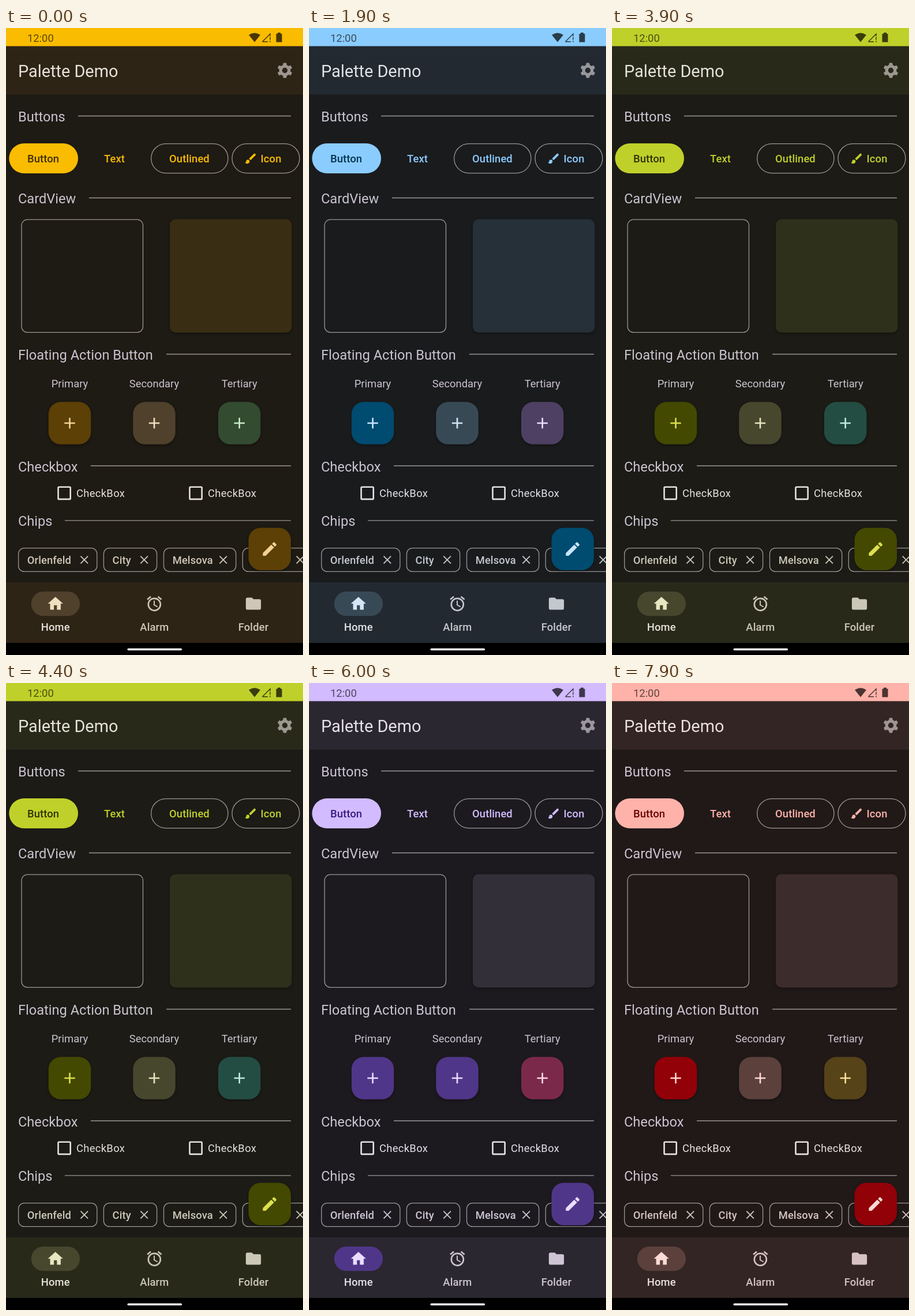
An HTML page for the animation above (8000 ms loop, 515 by 1087 pixels).

```html
<!DOCTYPE html>
<html lang="en">
<head>
<meta charset="utf-8">
<title>Colour themes</title>
<style>
html, body { margin: 0; width: 100%; height: 100%; overflow: hidden; background: #000; }
svg {
  display: block; width: 100%; height: 100%;
  font: 18.375px Roboto, sans-serif;
  --text: color-mix(in srgb, var(--onSecond) 25%, #e4e2e2);
  --muted: color-mix(in srgb, var(--onSecond) 45%, #b5b0b0);
  --line: color-mix(in srgb, var(--onSecond) 20%, #888484);
}
.head { font-size: 23.625px; fill: #cac4d0; }
.label { fill: #cac4d0; text-anchor: middle; }
.strong { font-weight: 500; letter-spacing: .13px; }
.body { letter-spacing: .33px; fill: var(--text); }
.mid { text-anchor: middle; }
.outline { fill: none; stroke: var(--line); stroke-width: 1.3; }
.raised { filter: drop-shadow(0 2px 2px #0005); }
</style>
</head>
<body>
<svg id="stage" viewBox="0 0 515 1087" preserveAspectRatio="none"></svg>
<script>
const LOOP = 8000;
const keys = ['primary', 'onPrimary', 'bg', 'bar', 'card', 'main', 'onMain',
  'second', 'onSecond', 'third', 'onThird'];
// Start time in ms, then the colours in the order of keys
const themes = [
  [0, 'f9bc00 3f2e00 1e1a14 2e2416 392d13 5c4006 f5d293 50412c efe0c0 334b30 c8ecc8'],
  [1000, '9ecaff 003258 1a1c1e 23282f 273039 00497d d1e4ff 3b4858 d7e3f8 523f5f f2daff'],
  [1900, '8bccff 00344f 1a1b1d 222930 253038 004b70 c8e6ff 384956 d4e5f5 4e4062 eeddff'],
  [2900, '9fd75c 1f3700 1a1b17 252a1f 2a311e 2e4f08 b4e873 404a33 dce7c8 1e4d4b bbece9'],
  [3900, 'c0d02a 2f3300 1c1b16 29291a 2f301b 434900 dce04f 46472d e6e6c0 234d43 bdecdb'],
  [5000, 'ffb0c0 650029 1f1919 302628 3b2d30 8f0039 ffd9df 5a4043 ffd9df 5b401a ffddb5'],
  [6000, 'd2bbff 3b1b80 1c1a1f 2a2730 322f39 503688 eaddff 503688 eaddff 7b294a ffd9e2'],
  [7000, 'ffb2aa 690005 201918 322524 3c2c2b 920008 ffdad5 5b403c ffdad5 564318 fadf98'],
].map(([start, colours]) => ({ start, colours: colours.split(' ') }));

const icons = {
  home: 'M10 20v-6h4v6h5v-8h3L12 3 2 12h3v8z',
  folder: 'M10 4H4c-1.1 0-2 .9-2 2v12c0 1.1.9 2 2 2h16c1.1 0 2-.9 2-2V8c0-1.1-.9-2-2-2h-8z',
  alarm: 'M22 5.72l-4.6-3.86-1.29 1.53 4.6 3.86zM7.88 3.39L6.6 1.86 2 5.71l1.29 1.53zM12.5 8H11v6l4.75 2.85.75-1.23-4-2.37zM12 4a9 9 0 1 0 0 18 9 9 0 0 0 0-18zm0 16a7 7 0 1 1 0-14 7 7 0 0 1 0 14z',
  edit: 'M3 17.25V21h3.75L17.81 9.94l-3.75-3.75zM20.71 7.04c.39-.39.39-1.02 0-1.41l-2.34-2.34c-.39-.39-1.02-.39-1.41 0l-1.83 1.83 3.75 3.75z',
  brush: 'M7 14c-1.66 0-3 1.34-3 3 0 1.31-1.16 2-2 2 .92 1.22 2.49 2 4 2 2.21 0 4-1.79 4-4 0-1.66-1.34-3-3-3zm13.71-9.37l-1.34-1.34c-.39-.39-1.02-.39-1.41 0L9 12.25 11.75 15l8.96-8.96c.39-.39.39-1.02 0-1.41z',
};

const fill = name => `fill="var(--${name})"`;
const text = (x, y, str, cls, attrs = '') => `<text x="${x}" y="${y}" class="${cls}" ${attrs}>${str}</text>`;
const box = (x, y, w, h, r, attrs) => `<rect x="${x}" y="${y}" width="${w}" height="${h}" rx="${r}" ${attrs}/>`;
const outline = (x, y, w, h, r) => box(x, y, w, h, r, 'class="outline"');
const stroke = (d, colour, width) => `<path d="${d}" fill="none" stroke="${colour}" stroke-width="${width}"/>`;
const icon = (name, cx, cy, colour, scale = 1.3125) =>
  `<path d="${icons[name]}" transform="translate(${cx} ${cy}) scale(${scale}) translate(-12 -12)" ${fill(colour)}/>`;
const section = (str, y, lineX) =>
  text(21, y, str, 'head') + stroke(`M${lineX} ${y - 9.5}H494`, 'var(--line)', 1.3);
const fab = (x, y, colour) => box(x, y, 73.5, 73.5, 21, `class="raised" ${fill(colour)}`);

const gear = () => [0, 60, 120, 180, 240, 300].map(a =>
  `<path d="M-3.6 -8L-2.6 -13H2.6L3.6 -8z" transform="translate(483.5 73.5) rotate(${a})" ${fill('line')}/>`).join('') +
  '<circle cx="483.5" cy="73.5" r="7.3" fill="none" stroke="var(--line)" stroke-width="5.2"/>';

const statusBar = () => box(0, 0, 515, 31.5, 0, fill('primary')) +
  text(37, 23.5, '12:00', '', 'fill="#000" opacity=".62"') +
  `<g opacity=".7"><path d="M431 24.5L421 12Q431 5 441 12z"/>
    <path d="M444.5 23.8H454M444.5 23.8L458 10.3V14M458 15.5V20.5M458 22.3V24.5" fill="none" stroke="#000" stroke-width="1.5"/>
    <path d="M468.5 10H471V8H476V10H478.500V24.500H468.500z"/></g>`;

const buttons = () => box(5.3, 200, 119.7, 52, 26, fill('primary')) +
  text(37, 233, 'Button', 'strong', fill('onPrimary')) +
  text(170, 233, 'Text', 'strong', fill('primary')) +
  outline(251.7, 200.6, 133.3, 51, 25.5) + text(283, 233, 'Outlined', 'strong', fill('primary')) +
  outline(392, 200.6, 117, 51, 25.5) + text(441.5, 233, 'Icon', 'strong', fill('primary')) +
  icon('brush', 424.3, 226.3, 'primary', .984);

const fabs = () => [['Primary', 110.5, 'main', 'onMain'], ['Secondary', 257, 'second', 'onSecond'],
  ['Tertiary', 404.7, 'third', 'onThird']].map(([name, x, colour, ink]) =>
  text(x, 622.5, name, 'label') + fab(x - 36.75, 648.3, colour) +
  stroke(`M${x - 9.2} 685H${x + 9.2}M${x} 675.8V694.2`, `var(--${ink})`, 2.6)).join('');

const checkboxes = () => [90.5, 318.5].map(x =>
  box(x, 795.7, 21.2, 21.2, 1.5, 'fill="none" stroke="var(--text)" stroke-width="2.6"') +
  text(x + 31.5, 813.3, 'CheckBox', 'body')).join('');

const chips = () => [['Orlenfeld', 21.6, 136.2], ['City', 169.4, 114 - 21.8], ['Melsova', 273.5, 125.2],
  ['', 410.3, 122]].map(([name, x, w]) => {
  const cx = name ? x + w - 22 : 510;
  return outline(x, 901.6, w, 40.800, 10) + text(x + 15.2, 928.5, name, 'strong', fill('muted')) +
    stroke(`M${cx - 6.3} 915.7l12.6 12.6m0 -12.6l-12.6 12.6`, 'var(--muted)', 1.9);
}).join('');

const nav = () => box(0, 961, 515, 105, 0, fill('bar')) +
  box(43.7, 977, 84.3, 42.300, 21, fill('second')) +
  [['Home', 85.7, 'onSecond', 'text'], ['Alarm', 257.3, 'muted', 'muted'], ['Folder', 429, 'muted', 'muted']]
    .map(([name, x, ink, label]) => icon(name.toLowerCase(), x, 998, ink) +
      text(x, 1045, name, 'strong mid', fill(label))).join('') +
  box(0, 1066, 515, 21, 0, 'fill="#000"') + box(210.5, 1075.5, 94.500, 3.500, 1.7, 'fill="#fff"');

const stage = document.getElementById('stage');
stage.innerHTML = [
  box(0, 0, 515, 1087, 0, fill('bg')),
  box(0, 31.5, 515, 84, 0, fill('bar')),
  statusBar(),
  text(21, 84.5, 'Palette Demo', '', `font-size="28.875" ${fill('text')}`),
  gear(),
  section('Buttons', 162, 125), buttons(),
  section('CardView', 304, 144),
  outline(27, 332.2, 210.5, 195.400, 10),
  box(284, 331.5, 211.5, 196.5, 10, `class="raised" ${fill('card')}`),
  section('Floating Action Button', 575, 278), fabs(),
  section('Checkbox', 768.5, 147), checkboxes(),
  section('Chips', 863.3, 102), chips(),
  fab(420.5, 866.5, 'main'), icon('edit', 457.2, 903.3, 'onMain'),
  nav(),
].join('');

let current;
function draw(now) {
  const time = now % LOOP;
  const theme = themes.findLast(t => t.start <= time);
  if (theme !== current) {
    current = theme;
    keys.forEach((key, i) => stage.style.setProperty('--' + key, '#' + theme.colours[i]));
  }
  requestAnimationFrame(() => draw(performance.now()));
}
draw(performance.now());
</script>
</body>
</html>
```
